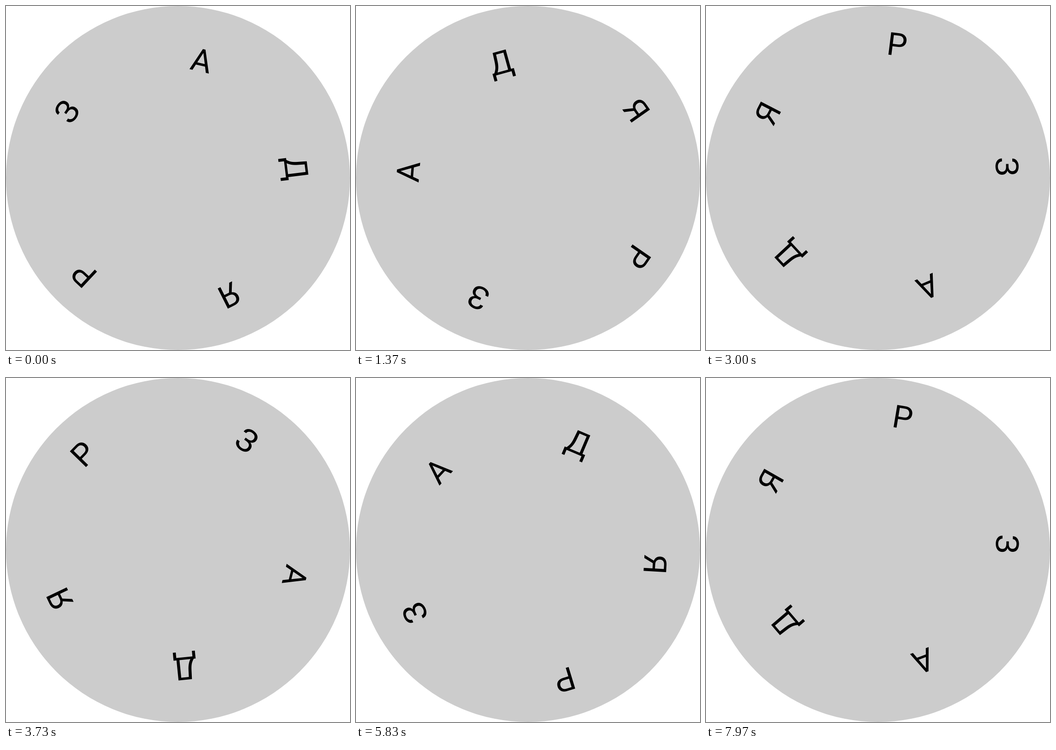
Animation, 748 px wide and 748 px high, one loop 8 s. Source, as an HTML page:

```html
<!DOCTYPE html>
<html lang="ru">
<head>
<meta charset="utf-8">
<title>Letter wheel</title>
<style>
  html, body { margin: 0; width: 100%; height: 100%; overflow: hidden; background: #fff; }
  svg { display: block; width: 100%; height: 100%; }
  text { font: 400 69px Roboto, sans-serif; fill: #000; }
</style>
</head>
<body>
<svg viewBox="0 0 748 748">
  <circle cx="374" cy="374" r="374" fill="#ccc"/>
  <g id="wheel"></g>
</svg>
<script>
const LOOP = 8000, FPS = 30, STEP = 2.4;

// tilt in degrees, baseline radius, horizontal centre of the ink
const letters = [
  { ch: 'А', tilt: 13, r: 236.3, mid: -7.4 },
  { ch: 'Д', tilt: 83, r: 233.3, mid: 9.4 },
  { ch: 'Я', tilt: 153.3, r: 253.4, mid: 13.4 },
  { ch: 'Р', tilt: 223.1, r: 269, mid: 6.7 },
  { ch: 'З', tilt: 305, r: 256.4, mid: -20 }
];

const wheel = document.getElementById('wheel');
const pen = document.createElement('canvas').getContext('2d');
pen.font = '400 69px Roboto, sans-serif';

for (const { ch, tilt, r, mid } of letters) {
  const ink = pen.measureText(ch);
  const el = document.createElementNS(wheel.namespaceURI, 'text');
  el.textContent = ch;
  el.setAttribute('x', mid - (ink.actualBoundingBoxRight - ink.actualBoundingBoxLeft) / 2);
  el.setAttribute('y', -r);
  el.setAttribute('transform', `rotate(${tilt})`);
  wheel.append(el);
}

function draw(ms) {
  // steps fall on times rounded to 10 ms
  const step = Math.floor((ms % LOOP + 4) * FPS / 1000);
  wheel.setAttribute('transform', `translate(374 374) rotate(${-step * STEP})`);
}

const start = performance.now();
function tick() {
  draw(performance.now() - start);
  requestAnimationFrame(tick);
}
tick();
</script>
</body>
</html>
```
